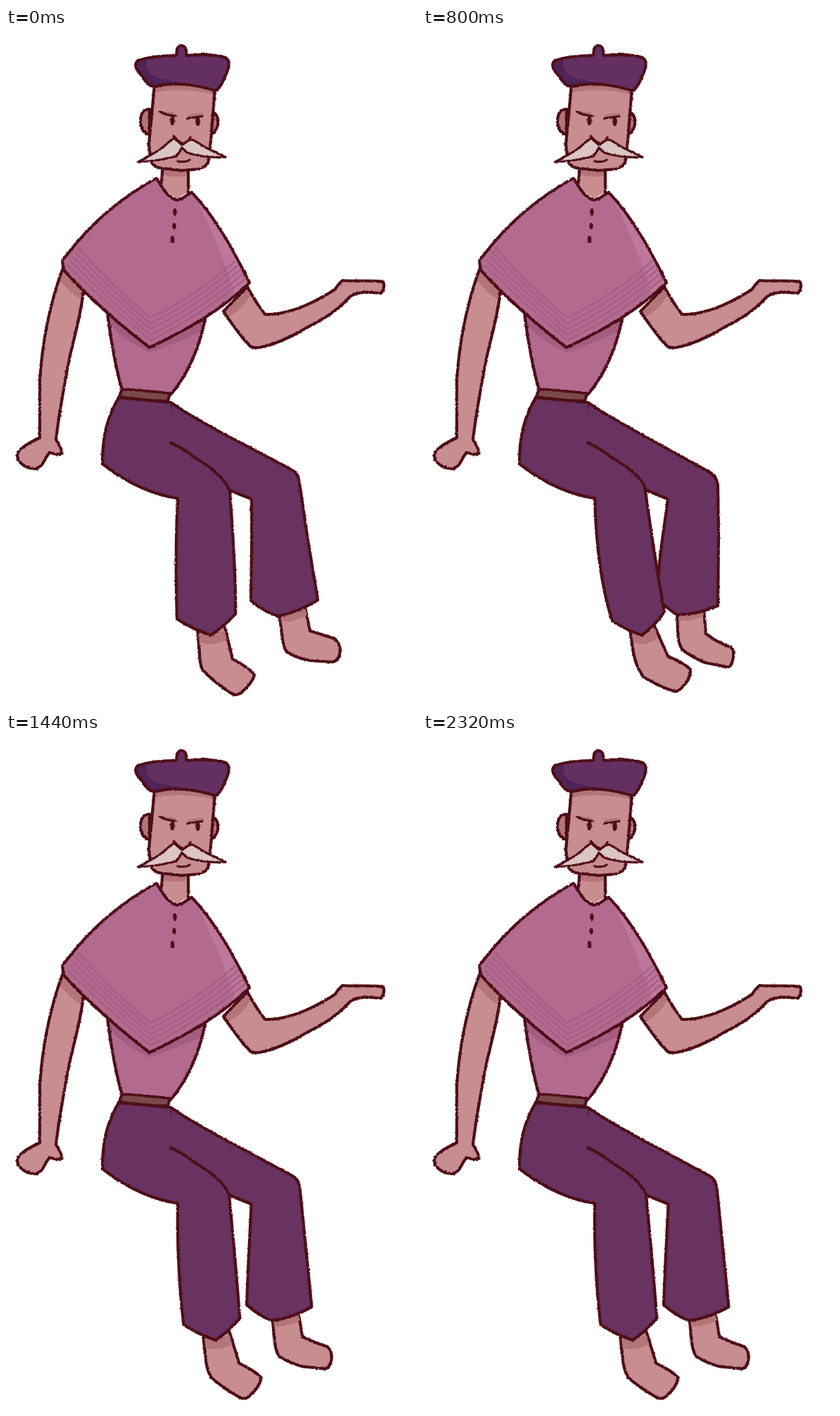
An HTML page that plays this animation: 584 by 960 pixels, repeating every 2400 ms.

```html
<!DOCTYPE html>
<html lang="en">
<head>
<meta charset="utf-8">
<title>Seated man swinging his legs</title>
<style>
  html, body { margin: 0; width: 100%; height: 100%; overflow: hidden; background: #fff; }
  svg { display: block; }
  .ink { stroke: #4e0e17; stroke-width: 4.2; stroke-linecap: round; stroke-linejoin: round; fill: none; }
  .thin { stroke-width: 3.2; }
  .skin { fill: #c88d90; }
  .shade { fill: #b4757a; }
  .hat { fill: #633061; }
  .pants { fill: #683360; }
  .cloth { fill: #b36a8f; }
  .belt { fill: #7c494d; }
  .hair { fill: #dcc5c5; }
  .dark { fill: #4e0e17; }
</style>
</head>
<body>
<svg width="584" height="960" viewBox="0 0 584 960">
  <defs>
    <filter id="rough" x="0" y="0" width="584" height="960" filterUnits="userSpaceOnUse" color-interpolation-filters="sRGB">
      <feTurbulence type="fractalNoise" baseFrequency=".35" numOctaves="2" seed="4"/>
      <feDisplacementMap in="SourceGraphic" scale="2.8" xChannelSelector="R" yChannelSelector="G"/>
    </filter>
    <path id="poncho" d="M214 213C166 239 119 277 80 330L82 343C108 373 165 424 204 453C252 430 302 404 346 361C320 309 296 267 264 233C257 236 252 243 243 244C231 241 223 229 214 213Z"/>
    <path id="hat" d="M188 46C203 41 223 39 242 39C243 31 242 26 249 25C256 25 256 32 257 39C278 37 300 38 312 42C319 46 317 57 312 67C308 77 304 86 297 89C270 80 238 76 211 83C203 82 198 77 195 70C188 62 179 53 188 46Z"/>
    <path id="torso" d="M144 404C149 442 155 480 165 513L234 520C258 492 274 454 283 413L204 440Z"/>
    <path id="face" d="M212 70L203 165L206 188Q209 198 222 199L250 202L274 200Q285 198 288 188L291 160L298 70Z"/>
    <path id="leftArm" d="M81 340C64 386 52 438 48 500L48 581C35 587 16 597 16 606L17 612C24 622 32 625 43 625C54 621 55 609 62 602C69 604 74 606 80 603C78 595 76 590 71 584C75 550 80 522 87 484C93 449 106 414 110 372Z"/>
    <clipPath id="inPoncho"><use href="#poncho"/></clipPath>
    <clipPath id="inHat"><use href="#hat"/></clipPath>
    <clipPath id="inTorso"><use href="#torso"/></clipPath>
    <clipPath id="inFace"><use href="#face"/></clipPath>
    <clipPath id="inArm"><use href="#leftArm"/></clipPath>
  </defs>
  <g filter="url(#rough)">
    <g id="legs"></g>

    <use href="#leftArm" class="skin"/>
    <path class="shade" clip-path="url(#inArm)" d="M70 330H120V392Q95 382 76 357Z"/>
    <use href="#leftArm" class="ink"/>
    <path class="ink skin" d="M309 402C320 418 334 439 348 452Q352 454 360 453C382 449 408 437 427 425C455 411 471 400 490 380Q500 374 516 375L533 376Q539 368 536 360C520 357 498 360 478 358Q472 363 467 371C448 383 421 397 400 402Q382 407 368 406Q354 388 343 367Z"/>
    <path class="shade" d="M313 401L318 409Q336 398 347 380L342 371Z"/>

    <use href="#torso" class="cloth"/>
    <path d="M140 400L204 452L288 412L279 430Q237 449 204 460Q168 444 143 416Z" fill="#a25d80" clip-path="url(#inTorso)"/>
    <use href="#torso" class="ink"/>
    <path class="ink belt" d="M165 512Q197 514 233 518L230 529Q194 528 161 523Z"/>

    <path class="skin" d="M222 196L219 225L243 242L260 232V196Z"/>
    <path class="shade" d="M222 200H260V208Q242 214 222 208Z"/>
    <path class="ink" d="M222 202Q222 216 219 225M259 202L259 235"/>

    <use href="#poncho" class="cloth"/>
    <g clip-path="url(#inPoncho)">
      <path d="M264 232Q296 287 326 379L352 362Q310 270 264 232Z" fill="#bd789c"/>
      <g id="stripes" fill="none" stroke="#a55d84" stroke-width="3" opacity=".8"></g>
    </g>
    <use href="#poncho" class="ink"/>
    <g class="dark">
      <ellipse cx="240" cy="261" rx="2.8" ry="5.5"/>
      <ellipse cx="239" cy="281" rx="2.8" ry="4.5"/>
      <ellipse cx="236.500" cy="300" rx="2.8" ry="5"/>
    </g>

    <path class="ink shade" d="M204 115C194 115 191 124 191 133C192 144 197 150 204 151ZM293 119C300 122 302 129 301 137C299 145 296 149 291 150Z"/>
    <use href="#face" class="skin"/>
    <path class="shade" clip-path="url(#inFace)" d="M205 70H300V95Q255 83 207 92Z"/>
    <use href="#face" class="ink"/>
    <g id="eyes"></g>
    <path class="ink thin hair" d="M239 156C230 162 221 172 211 177L188 190C207 189 226 186 242 182L250 170L258 177C276 183 294 184 312 183C298 176 282 170 275 164Q268 159 262 158L250 166Z"/>
    <path class="skin" d="M240 146L242 157L251 163L260 158L261 146Z"/>
    <path class="ink thin" d="M238 153Q243 160 251 164Q258 162 262 155M244 189Q255 191 261 187"/>

    <use href="#hat" class="hat"/>
    <path clip-path="url(#inHat)" fill="#4f2456" d="M180 40L200 44Q197 63 214 70Q240 77 271 81L300 92H185Z"/>
    <use href="#hat" class="ink"/>
  </g>
</svg>
<script>
const STEP = 80, SWING = 15, LOOP = 30;
const $ = id => document.getElementById(id);
const mix = (a, b, u) => {
  const target = b.match(/\d+/g);
  let i = 0;
  return a.replace(/\d+/g, n => (+n + (target[i++] - n) * u).toFixed(1));
};

// Each part has its pose at both ends of the swing.
const parts = [
  ["ink skin",
    "M388 826L392 860Q394 878 399 885Q414 894 432 897L464 899Q474 897 475 882Q474 872 467 866Q449 860 432 855L425 822",
    "M361 826L362 858Q363 874 369 882Q382 892 401 900L432 906Q439 907 441 891Q442 882 438 878Q419 872 402 859L399 825"],
  ["shade",
    "M390 832L391 842Q414 842 428 832L425 824Z",
    "M363 832L363 841Q386 840 399 834L398 828Z"],
  ["ink pants",
    "M234 531Q264 551 299 570L409 628Q415 632 417 645L428 720L443 811Q416 828 387 834Q366 828 348 812L349 740L349 668L319 656L225 600Z",
    "M234 531Q264 551 299 570L404 628Q418 635 419 650L420 720L419 819Q390 832 361 832Q347 823 331 808L338 740L348 668L319 656L225 600Z"],
  ["ink skin",
    "M272 853L275 886Q275 900 279 910Q297 929 321 944Q327 947 332 944Q350 930 353 917Q345 907 322 895L311 850",
    "M294 853L299 886Q302 904 313 920Q332 932 355 940Q361 942 365 938Q381 924 380 909Q370 900 348 891L329 848"],
  ["shade",
    "M274 860L275 872Q297 877 314 867L311 855Z",
    "M297 860L299 872Q319 877 334 865L330 852Z"],
  ["ink pants",
    "M234 531L160 524C143 554 137 579 137 618C165 640 201 660 244 667Q240 743 243 838Q266 853 291 861Q308 850 326 831Q327 778 318 657Q308 632 268 609Q252 596 234 588",
    "M234 531L160 524C143 554 137 579 137 618C165 640 201 660 244 667Q247 773 269 841Q292 855 311 861Q330 847 343 828Q330 758 315 650Q307 632 268 609Q252 596 234 588"]
];
$("legs").innerHTML = parts.map(([style]) => `<path class="${style}"/>`).join("");
const legPaths = [...$("legs").children];

for (let i = 0; i < 5; i++) {
  const y = i * 8;
  $("stripes").innerHTML += `<path d="M${102 - i * 4} ${311 + i * 6}Q148 ${363 + y} 205 ${411 + y}Q272 ${379 + y} ${326 + i * 4} ${330 + i * 6}"/>`;
}

const ease = k => ((1 - Math.cos(Math.PI * k / 8)) / 2) ** 0.9;

function drawEyes(shut) {
  const y = shut * 7, ry = 7 * (1 - shut);
  $("eyes").innerHTML = `
    <path class="shade" d="M218 117Q230 120 241 120L242 126L220 121ZM258 124Q268 120 280 121V126L258 129Z"/>
    <ellipse class="dark" cx="236.500" cy="${131 + shut * 2}" rx="3.2" ry="${ry}"/>
    <ellipse class="dark" cx="272.500" cy="${132 + shut * 2}" rx="3.2" ry="${ry}"/>
    <path class="ink thin" d="M219 ${119 + y}Q226 ${123 + y} 241 ${125 + y * .4}M258 ${128 + y * .3}Q267 ${127 + y * .5} 279 ${125 + y * .4}"/>`;
}

let last = -1;
function draw() {
  const tick = Math.floor(performance.now() / STEP) % LOOP;
  if (tick !== last) {
    last = tick;
    const k = tick % SWING;
    const u = ease(k < 9 ? k : 17 - k) / ease(7);
    parts.forEach(([, from, to], i) => legPaths[i].setAttribute("d", mix(from, to, u)));
    drawEyes({ 22: .42, 23: 1, 24: 1, 25: .42 }[tick] || 0);
  }
  requestAnimationFrame(draw);
}
draw();
</script>
</body>
</html>
```
